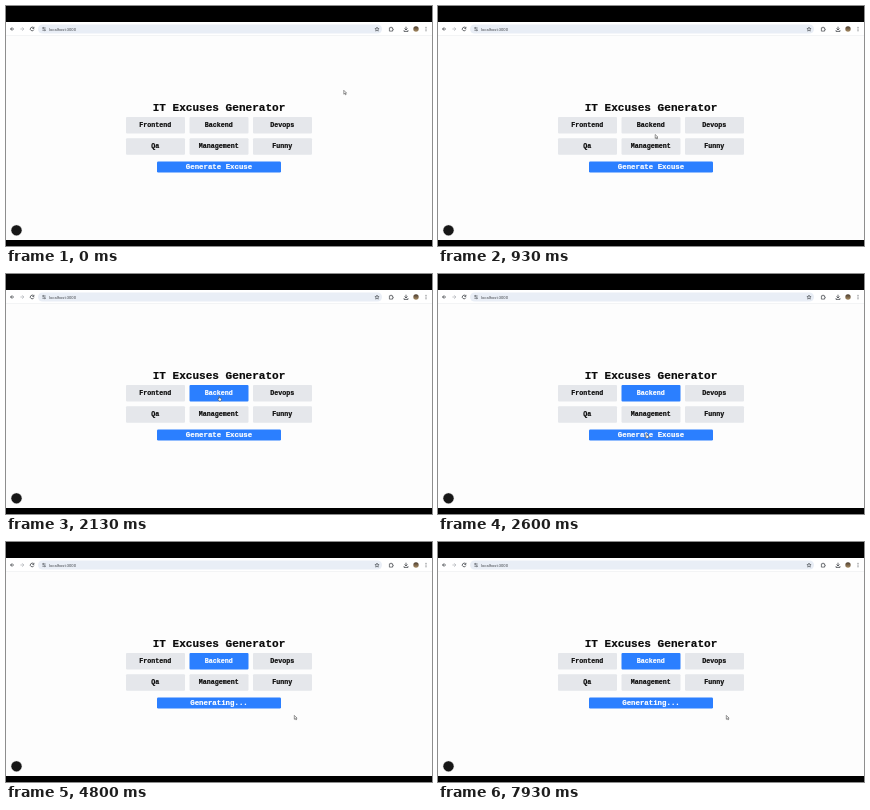
An HTML page that plays this animation: 426 by 240 pixels, repeating every 8000 ms.

```html
<!DOCTYPE html>
<html lang="en">
<head>
<meta charset="utf-8">
<title>IT Excuses Generator</title>
<style>
  html, body { margin: 0; width: 100%; height: 100%; overflow: hidden; background: #000; }
  svg { display: block; width: 100vw; height: 100vh; }
  .pixel { font-family: "Liberation Mono", monospace; font-weight: 700; text-anchor: middle;
           fill: #0a0a0a; stroke: #0a0a0a; stroke-width: .2; }
  .light { fill: #fff; stroke: #fff; }
  .url { font: 4.1px Roboto, sans-serif; fill: #45494f; }
  .icon { fill: none; stroke: #3f4348; stroke-width: .8; }
</style>
</head>
<body>
<svg viewBox="0 0 426 240">
  <rect y="16" width="426" height="218" fill="#fdfdfd"/>
  <rect y="16" width="426" height="13.5" fill="#fff"/>
  <path d="M0 29.5H426" stroke="#e6e8eb" stroke-width=".5"/>
  <rect x="32" y="18.5" width="344" height="9" rx="4.5" fill="#e9eef6"/>

  <g class="icon">
    <path d="M8 23H4.6M6.2 21.3L4.5 23L6.2 24.7"/>
    <path d="M14.4 23H17.8M16.2 21.3L17.9 23L16.2 24.7" stroke="#b4b7bb"/>
    <path d="M27.6 22A1.8 1.8 0 1 0 27.8 23.6M27.9 20.8V22.4H26.3"/>
    <path d="M36.3 22H39.7M36.3 24.2H39.7" stroke-width=".6"/>
    <circle cx="37.3" cy="22" r=".6" fill="#e9eef6" stroke-width=".5"/>
    <circle cx="38.8" cy="24.2" r=".6" fill="#e9eef6" stroke-width=".5"/>
    <path d="M371 21L371.6 22.5L373.1 22.6L371.9 23.6L372.3 25.1L371 24.3L369.7 25.1L370.1 23.6L368.9 22.6L370.4 22.5Z" stroke-width=".6"/>
    <path d="M383.4 21.8H384.6V21.2H385.6V21.8H386.6V23H387.2V24H386.6V25.1H383.4Z" stroke-width=".7"/>
    <path d="M400 20.7V23.8M398.5 22.5L400 24L401.5 22.5M398 24.2V25.4H402V24.2"/>
  </g>
  <text class="url" x="43" y="24.5">localhost:3000</text>
  <linearGradient id="portrait" x2="0" y2="1">
    <stop stop-color="#4b3d30"/><stop offset="1" stop-color="#a78b62"/>
  </linearGradient>
  <circle cx="410" cy="23" r="2.7" fill="url(#portrait)"/>
  <g fill="#3f4348">
    <circle cx="420" cy="21.3" r=".5"/><circle cx="420" cy="23" r=".5"/><circle cx="420" cy="24.7" r=".5"/>
  </g>

  <text class="pixel" x="213" y="105" font-size="11.06">IT Excuses Generator</text>
  <g id="categories"></g>
  <rect x="151" y="155.5" width="124" height="11" rx="1.2" fill="#2b7fff"/>
  <text id="action" class="pixel light" x="213" y="163.2" font-size="7.38"></text>

  <circle cx="10.5" cy="224.3" r="5.4" fill="#171717" stroke="#d9d9d9" stroke-width=".4"/>

  <g id="pointer" stroke="#333" stroke-width=".5" stroke-linejoin="round" fill="#fff">
    <path id="arrow" d="M0 0V3.9L.9 3.1L1.6 4.5L2.3 4.2L1.6 2.8H2.8Z"/>
    <path id="hand" d="M-.4 .2Q0 -.2 .4 .2V1.7L2.2 2.1V3.5L1.7 4.7H-.2L-1.4 2.8L-.9 2.4L-.4 2.9Z"/>
  </g>
</svg>
<script>
const LOOP = 8000, SELECT_AT = 2070, GENERATE_AT = 2800;
const byId = id => document.getElementById(id);
const SVG_NS = "http://www.w3.org/2000/svg";

// Time, x, y of the pointer tip.
const path = [
  [0, 337.8, 84.3], [870, 217.2, 128.5], [1000, 217.2, 128.5], [1650, 213.2, 122.3],
  [2150, 213.2, 122.3], [2550, 208.5, 159.5], [2850, 208.5, 159.5], [3450, 288.3, 173.4], [LOOP, 288.3, 173.4]
];

function add(parent, tag, attributes) {
  const node = document.createElementNS(SVG_NS, tag);
  for (const name in attributes) node.setAttribute(name, attributes[name]);
  return parent.appendChild(node);
}

const buttons = ["Frontend", "Backend", "Devops", "Qa", "Management", "Funny"].map((name, i) => {
  const x = 120 + i % 3 * 63.5, y = 111 + Math.floor(i / 3) * 21.2;
  const box = add(byId("categories"), "rect", { x, y, width: 59, height: 16.5, rx: 1, fill: "#e5e7eb" });
  const label = add(byId("categories"), "text", { x: x + 29.3, y: y + 10.2, class: "pixel", "font-size": 6.67 });
  label.textContent = name;
  return { box, label };
});
const backend = buttons[1];

function pointerAt(t) {
  const i = path.findIndex((point, n) => n && t <= point[0]);
  const [t0, x0, y0] = path[i - 1], [t1, x1, y1] = path[i];
  const p = (t - t0) / (t1 - t0), eased = p * p * (3 - 2 * p);
  return [x0 + (x1 - x0) * eased, y0 + (y1 - y0) * eased];
}

const inside = (x, y, left, top, width, height) =>
  x >= left && x <= left + width && y >= top && y <= top + height;

function draw(now) {
  const t = now % LOOP, [x, y] = pointerAt(t);
  const selected = t >= SELECT_AT, generating = t >= GENERATE_AT;
  const overBackend = inside(x, y, 183.5, 111, 59, 16.5);
  const overAction = !generating && inside(x, y, 151, 155.5, 124, 11);

  backend.box.setAttribute("fill", selected ? "#2b7fff" : overBackend ? "#d1d5db" : "#e5e7eb");
  backend.label.classList.toggle("light", selected);
  byId("action").textContent = generating ? "Generating..." : "Generate Excuse";
  byId("pointer").setAttribute("transform", `translate(${x} ${y})`);
  const useHand = overBackend || overAction;
  byId("arrow").style.display = useHand ? "none" : "";
  byId("hand").style.display = useHand ? "" : "none";
  requestAnimationFrame(draw);
}
draw(0);
</script>
</body>
</html>
```
